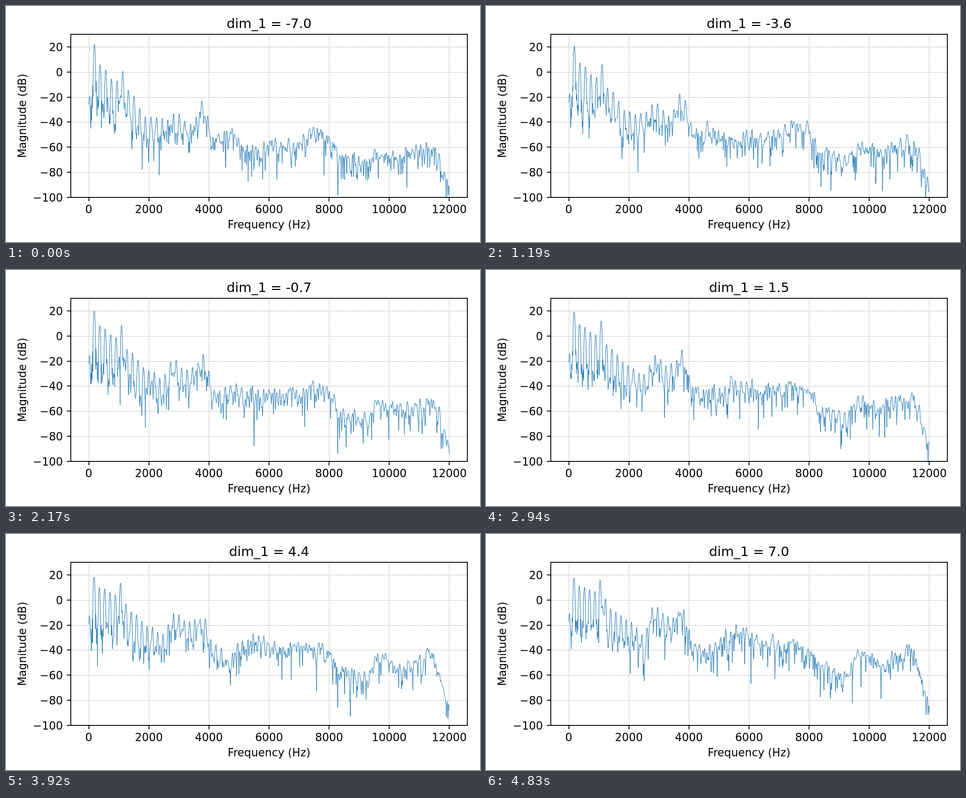
An HTML page for the animation above (4.9 s loop, 900 by 450 pixels).

```html
<!DOCTYPE html>
<html lang="en">
<head>
<meta charset="utf-8">
<title>Magnitude spectrum</title>
<style>
  html, body { margin: 0; width: 100%; height: 100%; overflow: hidden; background: #fff; }
  svg { display: block; width: 900px; height: 450px; }
  text { font: 20.83px "DejaVu Sans", sans-serif; fill: #000; text-anchor: middle; }
  .title { font-size: 25px; }
  .end { text-anchor: end; }
  .grid { stroke: #b0b0b0; stroke-width: 0.83; stroke-dasharray: 3.08 1.33; }
  .axis { stroke: #000; stroke-width: 1.67; fill: none; }
  .curve { stroke: #1f77b4; stroke-width: 0.95; stroke-linejoin: round; fill: none; }
</style>
</head>
<body>
<svg viewBox="0 0 900 450">
  <clipPath id="area"><rect x="123" y="54" width="753" height="311"/></clipPath>
  <g id="grid"></g>
  <path class="curve" id="curve" clip-path="url(#area)"/>
  <rect class="axis" x="123" y="54" width="753" height="311"/>
  <g id="ticks"></g>
  <text class="title" id="title" x="499.5" y="42"></text>
  <text x="499.5" y="424">Frequency (Hz)</text>
  <text transform="translate(38 209.5) rotate(-90)">Magnitude (dB)</text>
</svg>
<script>
const STEP = 70, COUNT = 70;
const BIN = 24000 / 1024, FINE = 4, POINTS = 512 * FINE + 1;
const $ = id => document.getElementById(id);
const px = hz => 157.2 + hz * 684.5 / 12000;
const py = db => 54 + (30 - db) * 311 / 130;

// Key points of the spectral envelope: Hz, dB at the start, dB at the end
const ENVELOPE = [
  [0, -20, -11], [180, 22, 17.5], [370, 6, 11], [900, -8, 7], [1090, 3, 17], [1300, -15, -6],
  [2000, -37, -16], [2500, -37, -27], [2850, -31, -4], [3300, -40, -16], [3750, -24, -6],
  [4200, -50, -34], [4650, -45, -37], [5500, -60, -20], [6400, -54, -31], [7900, -45, -34],
  [8350, -63, -48], [9150, -68, -58], [9700, -62, -40], [10300, -65, -48], [11400, -58, -38],
  [12050, -90, -82]
];

let seed = 41;
function random() {
  seed = seed + 0x6D2B79F5 | 0;
  let t = Math.imul(seed ^ seed >>> 15, 1 | seed);
  t = t + Math.imul(t ^ t >>> 7, 61 | t) ^ t;
  return ((t ^ t >>> 14) >>> 0) / 4294967296;
}
const gauss = () => Math.sqrt(-Math.log(1 - random())) * Math.cos(2 * Math.PI * random());
const noise = Array.from({ length: 513 }, () => ({
  a: gauss(), b: gauss(), c: gauss(), d: gauss(), rate: random() * 4 - 2
}));
const phases = Array.from({ length: 48 }, () => random() * 2 * Math.PI);

const gain = db => 10 ** (db / 20);
const lerp = (a, b, t) => a + (b - a) * t;
const smooth = t => t * t * (3 - 2 * t);

function level(hz, mix) {
  const i = ENVELOPE.findIndex(point => point[0] > hz);
  const [hz0, from0, to0] = ENVELOPE[i - 1], [hz1, from1, to1] = ENVELOPE[i];
  return lerp(lerp(from0, to0, mix), lerp(from1, to1, mix), smooth((hz - hz0) / (hz1 - hz0)));
}

// Transform of a Hann window, d in bins
function hann(d) {
  if (Math.abs(d) < 1e-6) return 1;
  if (Math.abs(Math.abs(d) - 1) < 1e-6) return 0.5;
  return Math.sin(Math.PI * d) / (Math.PI * d * (1 - d * d));
}

function spectrum(value) {
  const re = new Float64Array(POINTS), im = new Float64Array(POINTS);
  const add = (pos, reach, x, y) => {
    const end = Math.min(POINTS - 1, (pos + reach) * FINE);
    for (let i = Math.max(0, Math.ceil((pos - reach) * FINE)); i <= end; i++) {
      const w = hann(i / FINE - pos);
      re[i] += x * w;
      im[i] += y * w;
    }
  };
  const mix = (value + 7) / 14, pitch = 181 - 1.02 * value;

  // Harmonics fade into noise above 4 kHz
  for (let h = 0; h * pitch < 8000; h++) {
    const hz = h * pitch;
    const amp = gain(level(hz, mix) - 5 * Math.max(0, hz / 4000 - 1));
    add(h ? hz / BIN : 1, 30, amp * Math.cos(phases[h]), amp * Math.sin(phases[h]));
  }
  noise.forEach((n, k) => {
    const hz = k * BIN;
    const amp = gain(level(hz, mix) - 5 - 38 * Math.exp(-hz / 2000));
    const c = Math.cos(n.rate * value), s = Math.sin(n.rate * value);
    add(k, 6, amp * (n.a * c + n.b * s), amp * (n.c * c + n.d * s));
  });
  return re.map((x, i) => 20 * Math.log10(Math.hypot(x, im[i]) + 1e-7));
}

function line(x1, y1, x2, y2, cls) {
  return `<line class="${cls}" x1="${x1}" y1="${y1}" x2="${x2}" y2="${y2}"/>`;
}

function drawAxes() {
  let grid = "", ticks = "";
  for (let hz = 0; hz <= 12000; hz += 2000) {
    const x = Math.floor(px(hz)) + 0.5;
    grid += line(x, 365, x, 54, "grid");
    ticks += line(x, 365, x, 372.3, "axis") + `<text x="${px(hz)}" y="395">${hz}</text>`;
  }
  for (let db = -100; db <= 20; db += 20) {
    const y = Math.round(py(db));
    if (db > -100) grid += line(123, y + 0.5, 876, y + 0.5, "grid");
    ticks += line(115.7, y, 123, y, "axis") +
      `<text class="end" x="108" y="${y + 8}">${String(db).replace("-", "\u2212")}</text>`;
  }
  $("grid").innerHTML = grid;
  $("ticks").innerHTML = ticks;
}

const paths = [];
function pathFor(i, value) {
  return paths[i] ??= "M" + Array.from(spectrum(value),
    (db, k) => px(k * BIN / FINE).toFixed(2) + " " + py(db).toFixed(2)).join("L");
}

let shown = -1;
const start = performance.now();
function render(now) {
  const i = Math.floor(Math.max(0, now - start) / STEP) % COUNT;
  if (i !== shown) {
    const value = -7 + 14 * i / (COUNT - 1);
    $("title").textContent = "dim_1 = " + value.toFixed(1);
    $("curve").setAttribute("d", pathFor(i, value));
    shown = i;
  }
  requestAnimationFrame(render);
}

drawAxes();
render(start);
</script>
</body>
</html>
```
